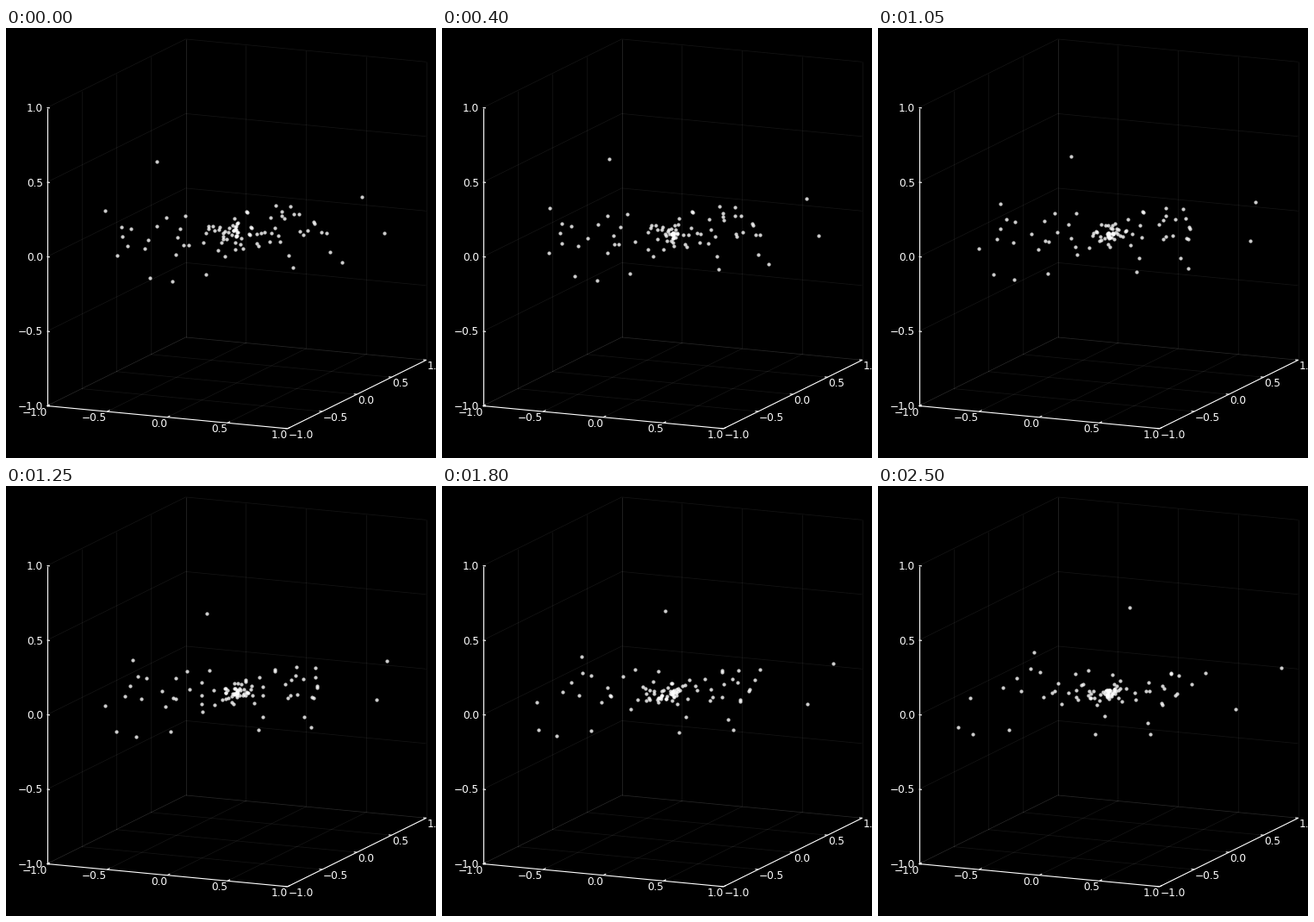
A matplotlib script for the animation above (2550 ms loop, 499x499 px).

```python
import numpy as np
import matplotlib.pyplot as plt
from matplotlib.animation import FuncAnimation
from matplotlib.collections import LineCollection

SIZE, DPI, FRAMES, STEP = 499, 100, 51, 50
PX = 72 / DPI  # points per pixel

# Screen vectors of one data unit along each axis
ORIGIN = np.array([267.6, 238.9])
AXES = np.array([[139.6, 13.2], [80.5, -39.8], [0, -173]])
TICKS = np.linspace(-1, 1, 5)

# Outermost stars: pixel offsets from the centre at the start
OUTER = [
    (-92.7, -84.4), (-152.2, -27), (-134, -8.4), (-133, 2.6), (-122.7, -6.4),
    (-126.7, 13.6), (-138.7, 24.6), (-100.7, 50.6), (-74.2, 54.6),
    (-36, 46.6), (65.8, 39.1), (122.3, 32.6), (108.3, 21.1), (171.8, -1.4),
    (145.3, -42.9), (89.3, -14.4), (62.3, -31.9), (82.3, -4.4), (77.8, 0.6),
]
INNER = 77
MASS, SOFT, SPIN = 0.025, 0.06, 0.2
SUBSTEPS = 10


def project(points):
    return ORIGIN + np.asarray(points) @ AXES


def start_positions():
    rng = np.random.default_rng(5)
    outer = np.array(OUTER) @ np.linalg.inv(AXES[:2])
    r = 0.72 * rng.random(INNER) ** 1.3
    a = rng.uniform(0, 2 * np.pi, INNER)
    inner = np.column_stack([r * np.cos(a), r * np.sin(a)])
    z = np.append(np.zeros(len(OUTER)), rng.normal(0, 0.025, INNER))
    return np.column_stack([np.vstack([outer, inner]), z])


def pull(pos):
    """Softened gravity of the central mass."""
    d2 = (pos ** 2).sum(axis=1, keepdims=True) + SOFT ** 2
    return -MASS * pos / d2 ** 1.5


def simulate():
    """Clockwise disc, too slow near the middle, so its core falls inwards."""
    pos = start_positions()
    x, y, _ = pos.T
    speed = SPIN / np.sqrt(np.hypot(x, y))  # per unit radius
    vel = np.column_stack([speed * y, -speed * x, 0 * x])
    dt = STEP / 1000 / SUBSTEPS
    path = [project(pos)]
    for _ in range(FRAMES - 1):
        for _ in range(SUBSTEPS):
            vel = vel + pull(pos) * dt / 2
            pos = pos + vel * dt
            vel = vel + pull(pos) * dt / 2
        path.append(project(pos))
    return path


fig = plt.figure(figsize=(SIZE / DPI, SIZE / DPI), dpi=DPI, facecolor="black")
ax = fig.add_axes([0, 0, 1, 1])
ax.set_xlim(0, SIZE)
ax.set_ylim(SIZE, 0)
ax.axis("off")


def draw_lines(pairs, width, alpha, z):
    ax.add_collection(LineCollection([project(p) for p in pairs], colors="white",
                                     alpha=alpha, linewidths=width * PX, zorder=z))


def label(point, shift, value, align):
    x, y = project(point) + shift
    ax.text(x, y, f"{value:.1f}".replace("-", "\u2212"), color="white",
            family="DejaVu Sans", size=12.1 * PX, ha=align,
            va="center_baseline", zorder=3)


grid = []
edges = [((-1, -1, -1), (-1, -1, 1)),
         ((-1, -1, -1), (1, -1, -1)),
         ((1, -1, -1), (1, 1, -1))]
for k in TICKS:
    grid += [((k, -1, -1), (k, 1, -1)), ((-1, k, -1), (1, k, -1)),
             ((-1, k, -1), (-1, k, 1)), ((-1, -1, k), (-1, 1, k)),
             ((k, 1, -1), (k, 1, 1)), ((-1, 1, k), (1, 1, k))]
    edges += [((-1, -1, k), (-0.975, -1, k)),
              ((k, -1, -1), (k, -0.96, -1)),
              ((1, k, -1), (0.975, k, -1))]
    label((-1, -1, k), (-4.5, -0.5), k, "right")
    label((k, -1, -1), (0, 6), k, "right")
    label((1, k, -1), (0.8, 6), k, "left")
draw_lines(grid, 0.8, 0.08, 1)
draw_lines(edges, 1.1, 1, 2)

path = simulate()
dots = ax.scatter(*path[0].T, s=(4.2 * PX) ** 2, c="white", alpha=0.8,
                  linewidths=0, zorder=4)


def update(i):
    dots.set_offsets(path[i])
    return (dots,)


anim = FuncAnimation(fig, update, frames=FRAMES, interval=STEP,
                     repeat=True, repeat_delay=0, blit=False)
plt.show()
```
